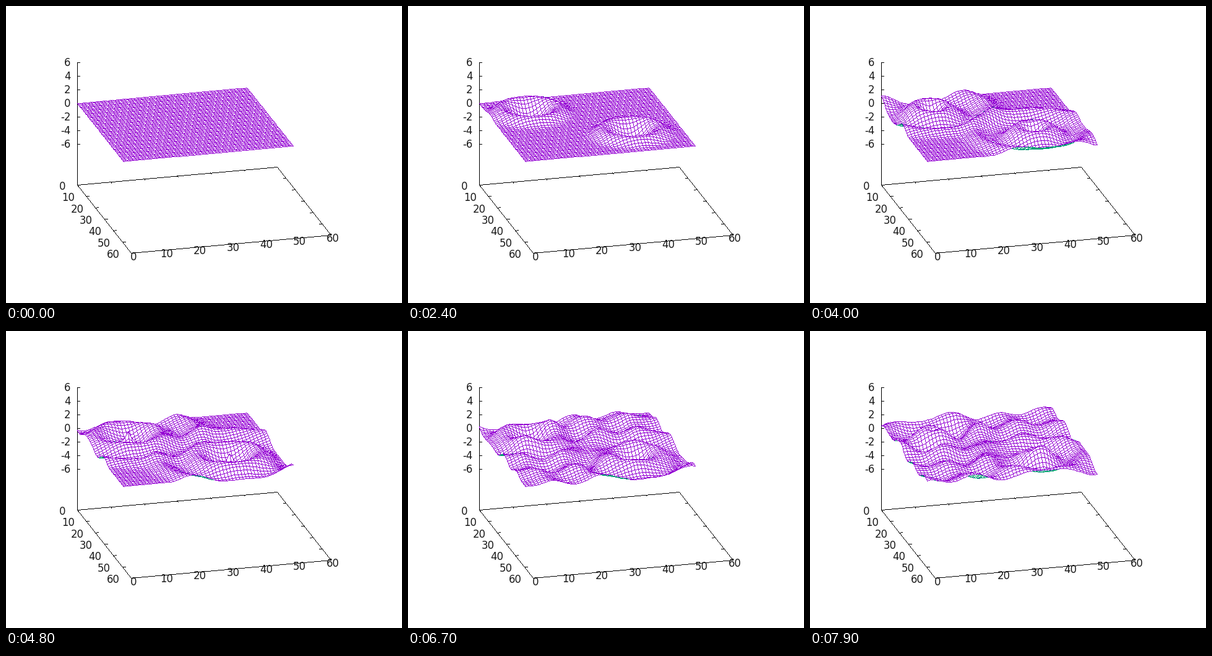
Recreate the animation shown at these times as a matplotlib script. Size 640 by 480 pixels, loop 8000 ms.

```python
import numpy as np
import matplotlib.pyplot as plt
from matplotlib.animation import FuncAnimation

W, H, DPI = 640, 480, 100
FRAMES, STEP_MS = 80, 100
FONT_PX = 16.5

# Palette of the raster: paper, axes, top and underside of the mesh
PAPER, INK, TOP, UNDER = range(4)
PALETTE = np.array([[255, 255, 255], [0, 0, 0], [148, 0, 211], [0, 158, 115]],
                   dtype=np.uint8)

# Screen vectors of the view, in pixels per unit
ORIGIN = np.array([115.0, 157.0])
B_DIR = np.array([322.8, -29.4]) / 60
A_DIR = np.array([87.4, 110.4]) / 60
Z_PX = 11.0
FLOOR = -12

# Wave on a grid with two small driven spots and edges that let waves out
SIZE = 52
SOURCES = (12, 36)
SPEED2, OMEGA, DRIVE, SPOT = 0.3, 0.284, 1.05, 1.3

A, B = np.mgrid[0:SIZE, 0:SIZE]


def project(a, b, z):
    x = ORIGIN[0] + B_DIR[0] * b + A_DIR[0] * a
    y = ORIGIN[1] + B_DIR[1] * b + A_DIR[1] * a - Z_PX * z
    return np.stack([x, y], axis=-1)


def simulate():
    force = DRIVE * sum(np.exp(-SPOT * ((A - s) ** 2 + (B - s) ** 2))
                        for s in SOURCES)
    old = np.zeros((SIZE, SIZE))
    now = np.zeros((SIZE, SIZE))
    states = []
    for n in range(FRAMES):
        states.append(now)
        p = np.pad(now, 1, mode="edge")
        lap = p[2:, 1:-1] + p[:-2, 1:-1] + p[1:-1, 2:] + p[1:-1, :-2] - 4 * now
        new = 2 * now - old + SPEED2 * lap + force * np.sin(OMEGA * n)
        # each edge repeats what its inner neighbour just did
        new[0], new[-1] = now[1], now[-2]
        new[:, 0], new[:, -1] = now[:, 1], now[:, -2]
        old, now = now, new
    return states


def to_pixel(p):
    return np.floor(np.asarray(p) + 0.5).astype(int)


def line_pixels(p, q):
    """Pixels of one-pixel lines; short lines repeat their last pixel."""
    d = q - p
    n = np.maximum(np.abs(d).max(axis=-1), 1)[..., None]
    t = np.minimum(np.arange(n.max() + 1), n) / n
    return to_pixel(p[..., None, :] + t[..., None] * d[..., None, :])


def flat_index(p):
    x = np.clip(p[..., 0], 0, W - 1)
    y = np.clip(p[..., 1], 0, H - 1)
    return y * W + x


def label(x, y, text, ha):
    ax.text(x, y + 0.365 * FONT_PX, text, ha=ha, va="baseline",
            color="#181818", family="DejaVu Sans", size=FONT_PX * 72 / DPI)


def draw_axes():
    raster = np.full(W * H, PAPER, dtype=np.uint8)

    def line(p, q):
        raster[flat_index(line_pixels(to_pixel(p), to_pixel(q)))] = INK

    def floor_point(a, b):
        return project(a, b, FLOOR)

    corners = [floor_point(*c) for c in ((0, 0), (0, 60), (60, 60), (60, 0))]
    for i in range(4):
        line(corners[i], corners[(i + 1) % 4])
    line(corners[0], project(0, 0, 6))

    tick_b = np.array([4.8, -0.44])
    tick_a = np.array([1.3, 1.7])
    for i in range(7):
        v = 10 * i
        for p, d in ((floor_point(v, 0), tick_b), (floor_point(v, 60), -tick_b),
                     (floor_point(0, v), tick_a), (floor_point(60, v), -tick_a)):
            line(p, p + d)
        label(96.3 + 14.5 * i, 291 + 18.3 * i, str(v), "right")
        label(206 + 53.7 * i, 405 - 5 * i, str(v), "center")

    for z in range(-6, 7, 2):
        p = project(0, 0, z)
        line(p, p + (4, 0))
        label(104.5, p[1], str(z), "right")
    return raster


def draw_mesh(raster, z):
    """Paint the grid cells from back to front, each filled then outlined."""
    p = project(A, B, z)
    q = np.stack([p[:-1, :-1], p[:-1, 1:], p[1:, 1:], p[1:, :-1]], axis=2)
    q = q[:, ::-1].reshape(-1, 4, 2)
    d1, d2 = q[:, 2] - q[:, 0], q[:, 3] - q[:, 1]
    under = d1[:, 0] * d2[:, 1] - d1[:, 1] * d2[:, 0] < 0
    q = to_pixel(q)

    inside = to_pixel(np.einsum("sk,qkd->qsd", FILL, q))
    edges = line_pixels(q, np.roll(q, -1, axis=1)).reshape(len(q), -1, 2)
    where = flat_index(np.concatenate([inside, edges], axis=1))
    color = np.full(where.shape, PAPER, dtype=np.uint8)
    color[:, len(FILL):] = np.where(under, UNDER, TOP)[:, None]
    # repeated pixels keep the last value, so nearer cells win
    raster[where.ravel()] = color.ravel()


# Bilinear weights of sample points inside a cell
u, v = [g.ravel() for g in np.meshgrid((np.arange(8) + 0.5) / 8,
                                       (np.arange(20) + 0.5) / 20)]
FILL = np.stack([(1 - u) * (1 - v), u * (1 - v), u * v, (1 - u) * v], axis=1)

fig = plt.figure(figsize=(W / DPI, H / DPI), dpi=DPI, facecolor="white")
ax = fig.add_axes([0, 0, 1, 1])
ax.axis("off")

BASE = draw_axes()
STATES = simulate()
image = ax.imshow(PALETTE[BASE].reshape(H, W, 3), extent=(0, W, H, 0),
                  interpolation="nearest", aspect="auto")
ax.set_xlim(0, W)
ax.set_ylim(H, 0)


def update(n):
    raster = BASE.copy()
    draw_mesh(raster, STATES[n])
    image.set_data(PALETTE[raster].reshape(H, W, 3))
    return [image]


anim = FuncAnimation(fig, update, frames=FRAMES, interval=STEP_MS,
                     init_func=lambda: update(0), repeat=True, repeat_delay=0)
plt.show()
```
